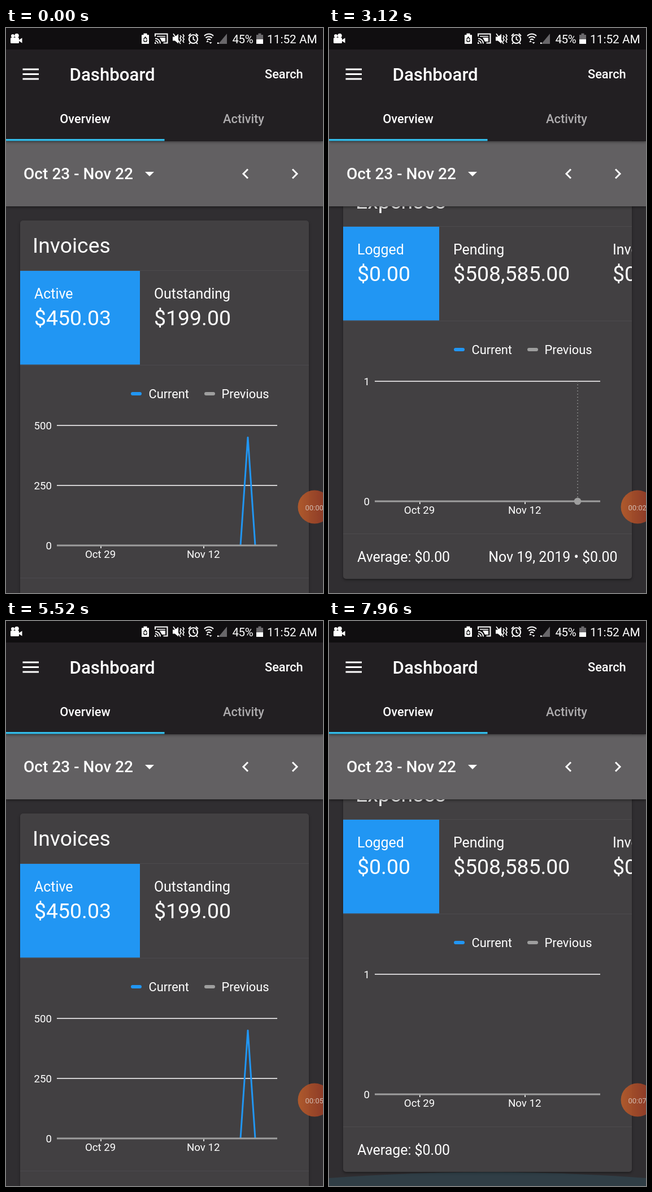
These frames come from a looping animation (561 by 998 pixels, 8000 ms). An HTML page:

```html
<!DOCTYPE html>
<html lang="en">
<head>
<meta charset="utf-8">
<title>Dashboard</title>
<style>
html, body { margin: 0; width: 100%; height: 100%; overflow: hidden; background: #302e31; }
svg { display: block; width: 100%; height: 100%; }
text { font-family: Roboto, "Noto Sans", sans-serif; fill: #fff; white-space: pre; }
.m { font-weight: 500; }
.card { filter: drop-shadow(0 2px 2px #0006); }
</style>
</head>
<body>
<svg id="stage" viewBox="0 0 561 998" preserveAspectRatio="none"></svg>
<script>
const LOOP = 8000, STEP = 40, PITCH = 761;
const BLUE = '#2196f3', GRAY = '#9e9e9e', ACCENT = '#33bbe8';

// columns: [x, label, amount]; points: [day, value]; hidden: times when the lines are not drawn yet
const cards = [
  { title: 'Invoices', split: 237, columns: [[50, 'Active', '$450.03'], [262, 'Outstanding', '$199.00']],
    left: 90, max: 500, grid: [500, 250, 0], points: [[25, 0], [26, 450], [27, 0]],
    average: '$450.03', hidden: [[4700, 5300]] },
  { title: 'Payments', split: 237, columns: [[50, 'Active', '$251.03'], [262, 'Refunded', '$0.00']],
    left: 90, max: 160, grid: [160, 80, 0], points: [[25, 0], [26, 100], [27, 0], [28, 151], [29, 0]],
    average: '$251.03', hidden: [[4480, 5000]] },
  { title: 'Quotes', split: 237, columns: [[50, 'Active', '$100.00'], [262, 'Approved', '$0.00'], [443, 'Unapproved', '$100.00']],
    left: 90, max: 100, grid: [100, 50, 0], points: [[25, 0], [26, 100], [27, 0]],
    average: '$100.00', hidden: [[0, 1750]] },
  { title: 'Expenses', split: 195, columns: [[50, 'Logged', '$0.00'], [220, 'Pending', '$508,585.00'], [502, 'Invoiced', '$0.00']],
    left: 81, max: 1, grid: [1, 0], points: [],
    average: '$0.00', hidden: [[0, 2150], [6000, 7480]] }
];

// [time, scroll offset]
const scrollKeys = [
  [1200, 0], [1240, 30], [1280, 90], [1400, 90], [1440, 420], [1600, 1445], [1760, 1830], [1920, 2080], [2100, 2260], [2240, 2361],
  [4440, 2361], [4480, 2320], [4640, 1880], [4800, 1300], [5000, 720], [5160, 380], [5280, 180], [5400, 55], [5520, 0],
  [6160, 0], [6200, 40], [6320, 235], [6440, 467], [6640, 830], [6840, 1120], [7000, 1270], [7080, 1305],
  [7200, 1500], [7320, 1950], [7473, 2361]
];
const impacts = [2240, 7473];

const text = (x, y, size, str, attrs = '') => `<text x="${x}" y="${y}" font-size="${size}" ${attrs}>${str}</text>`;
const rect = (x, y, w, h, fill, attrs = '') => `<rect x="${x}" y="${y}" width="${w}" height="${h}" fill="${fill}" ${attrs}/>`;
const path = (d, stroke, width, attrs = '') => `<path d="${d}" fill="none" stroke="${stroke}" stroke-width="${width}" ${attrs}/>`;
const shape = (d, fill = '#fff') => `<path d="${d}" fill="${fill}"/>`;

function drawCard(card, i) {
  const dayX = d => card.left + d * (480 - card.left) / 30;
  const valueY = v => 574 - 212 * v / card.max;
  const line = card.points.map(([d, v]) => `${dayX(d)} ${valueY(v)}`).join('L');
  const divider = y => rect(25, y, 511, 1, '#4c4a4d');
  return `<g transform="translate(0 ${340 + i * PITCH})">
    ${rect(25, 0, 511, 711, '#424042', 'rx="5" class="card"')}
    ${text(47, 56.5, 37.4, card.title)}
    ${divider(88)}${divider(255)}${divider(631)}
    ${rect(25, 89, card.split - 25, 165.5, BLUE)}
    <g clip-path="url(#cardClip)">${card.columns.map(([x, label, amount]) =>
      text(x, 137.5, 24.9, label) + text(x, 184.5, 37.4, amount)).join('')}</g>
    ${rect(221, 303, 19, 6, BLUE, 'rx="3"')}${text(252.5, 314, 21.8, 'Current')}
    ${rect(351, 303, 19, 6, GRAY, 'rx="3"')}${text(381.5, 314, 21.8, 'Previous')}
    ${card.grid.map(v => path(`M${card.left} ${valueY(v)}H480`, '#fff', 1.6) +
      text(card.left - 9, valueY(v) + 6.6, 18.7, v, 'text-anchor="end"')).join('')}
    ${[[6, 'Oct 29'], [20, 'Nov 12']].map(([d, label]) => path(`M${dayX(d)} 574v5`, '#fff', 1.6) +
      text(dayX(d) - 0.8, 596, 18.7, label, 'text-anchor="middle"')).join('')}
    <g class="lines">${line && path('M' + line, BLUE, 3, 'stroke-linejoin="round"')}
      ${path(`M${card.left} 574H480`, GRAY, 3)}</g>
    ${text(50, 680.5, 24.9, 'Average: ' + card.average)}
  </g>`;
}

const statusIcons = `
  ${rect(8, 17, 15, 10, '#fff', 'rx="1.5"')}${shape('M23 21l5.5-3.5v9L23 23z')}
  <circle cx="12" cy="14" r="3" fill="#fff"/><circle cx="19" cy="13.5" r="3.8" fill="#fff"/>
  ${rect(240, 12, 13, 16, '#fff', 'rx="1"')}${rect(243.5, 9.5, 6, 3, '#fff')}
  ${path('M243.5 20l3-4 3 4M249.5 21l-1 3h-4l-1-3', '#111', 1.5)}
  ${path('M264 15v-4.500h21.500v16h-7M264 18.500a9 9 0 0 1 9 9M264 22.500a5 5 0 0 1 5 5', '#fff', 2)}
  ${rect(267, 14, 15, 1.500, '#fff')}${shape('M263 25a3 3 0 0 1 3 3h-3zM272 17h10v7h-6z')}
  ${shape('M295 15.500h4l6-5v17l-6-5h-4z')}${path('M296 10l13 18M308 13l2 2-2 3 2 3-2 3M313 11l2 3-2 3 2 3-2 3 2 3', '#fff', 1.7)}
  <circle cx="331.500" cy="19.500" r="7.500" fill="none" stroke="#fff" stroke-width="2.200"/>
  ${path('M331.500 15v5l3.500 2M323 14l4-4M340 14l-4-4M326 26l-2 2M337 26l2 2', '#fff', 2)}
  ${path('M351 14a11 11 0 0 1 16 0M353.500 17.500a8 8 0 0 1 11 0M356 21a4.500 4.500 0 0 1 6 0', '#fff', 2)}
  ${shape('M354 25l2.500-3 2.500 3zM359.500 25l2.500 3 2.500-3z')}
  ${shape('M391 10v18h-15z', '#69676a')}${rect(374, 25.500, 2.500, 2.500, '#fff')}
  ${text(400.5, 27, 20.5, '45%', 'letter-spacing="-.4"')}
  ${rect(443, 12, 12, 16, '#6b696c')}${rect(446.5, 9.5, 5, 3, '#6b696c')}${rect(443, 20, 12, 8, '#fff')}
  ${text(462, 27, 20.8, '11:52 AM')}`;

const header = `
  ${rect(0, 200, 561, 115, '#626062', 'class="card"')}
  ${rect(0, 0, 561, 199.5, '#221f22', 'class="card"')}
  ${rect(0, 0, 561, 38, '#100e10')}
  ${statusIcons}
  ${path('M29.5 73H58M29.5 81.500H58M29.500 90H58', '#fff', 3)}
  ${text(112.5, 92.5, 31.2, 'Dashboard', 'class="m"')}
  ${text(458, 89, 21.8, 'Search', 'class="m"')}
  ${text(140, 168, 21.8, 'Overview', 'class="m" text-anchor="middle"')}
  ${text(420.5, 168, 21.8, 'Activity', 'class="m" text-anchor="middle" style="fill:#aeacae"')}
  ${rect(0, 196, 280.5, 3.5, ACCENT)}
  ${text(31, 267, 28.05, 'Oct 23 - Nov 22', 'class="m"')}
  ${shape('M246 254h16l-8 8z')}
  ${path('M428 249.500l-8 8 8 8M507 249.500l8 8-8 8', '#fff', 3)}`;

const $ = id => document.getElementById(id);
$('stage').innerHTML = `
  <defs>
    <clipPath id="cardClip"><rect x="25" y="89" width="511" height="166"/></clipPath>
    <linearGradient id="orange"><stop offset="0" stop-color="#b85c2a"/><stop offset="1" stop-color="#8c3426"/></linearGradient>
  </defs>
  ${rect(0, 0, 561, 998, '#302e31')}
  <g id="list">${cards.map(drawCard).join('')}
    <g id="tip" transform="translate(0 ${340 + 3 * PITCH})">
      ${path('M440 362V574', GRAY, 1.5, 'stroke-dasharray="1.5 4"')}
      <circle cx="440" cy="574" r="6.3" fill="${GRAY}"/>
      ${text(510.5, 680.5, 24.9, 'Nov 19, 2019 • $0.00', 'text-anchor="end"')}
    </g>
  </g>
  <ellipse id="glow" cx="280.5" rx="841" fill="${ACCENT}"/>
  ${header}
  <circle cx="546" cy="846" r="29.5" fill="url(#orange)" opacity=".92"/>
  ${text(529.5, 851.5, 13, '', 'id="timer" style="fill:#d3b9ae"')}`;
const lines = [...document.querySelectorAll('.lines')];

function scrollAt(t) {
  const i = scrollKeys.findIndex(k => k[0] > t);
  if (i === 0) return 0;
  if (i < 0) return scrollKeys.at(-1)[1];
  const [t0, s0] = scrollKeys[i - 1], [t1, s1] = scrollKeys[i];
  return s0 + (s1 - s0) * (t - t0) / (t1 - t0);
}

// Edge glow: quick rise on impact, then a decelerating fade
function glowAt(age) {
  if (age < 0 || age > 767) return 0;
  return age < 167 ? 1 - (1 - age / 167) ** 2 : (1 - (age - 167) / 600) ** 2;
}

function render(t) {
  $('list').setAttribute('transform', `translate(0 ${-scrollAt(t)})`);
  cards.forEach((card, i) => {
    const fade = Math.min(1, ...card.hidden.map(([from, to]) => t < from ? 1 : Math.max(0, (t - to) / 120)));
    lines[i].setAttribute('opacity', fade);
  });
  $('tip').setAttribute('visibility', t >= 3120 && t < 5160 ? 'visible' : 'hidden');
  const k = Math.max(...impacts.map(hit => glowAt(t - hit)));
  const glow = $('glow');
  glow.setAttribute('cy', 998 + 729 * k);
  glow.setAttribute('ry', 841 * k);
  glow.setAttribute('opacity', 0.5 * k);
  $('timer').textContent = '00:0' + Math.max(0, Math.floor((t - 759) / 946.9));
}

const start = performance.now();
function tick(now) {
  const t = Math.max(0, now - start) % LOOP;
  render(Math.floor(t / STEP) * STEP);
  requestAnimationFrame(tick);
}
render(0);
requestAnimationFrame(tick);
</script>
</body>
</html>
```
